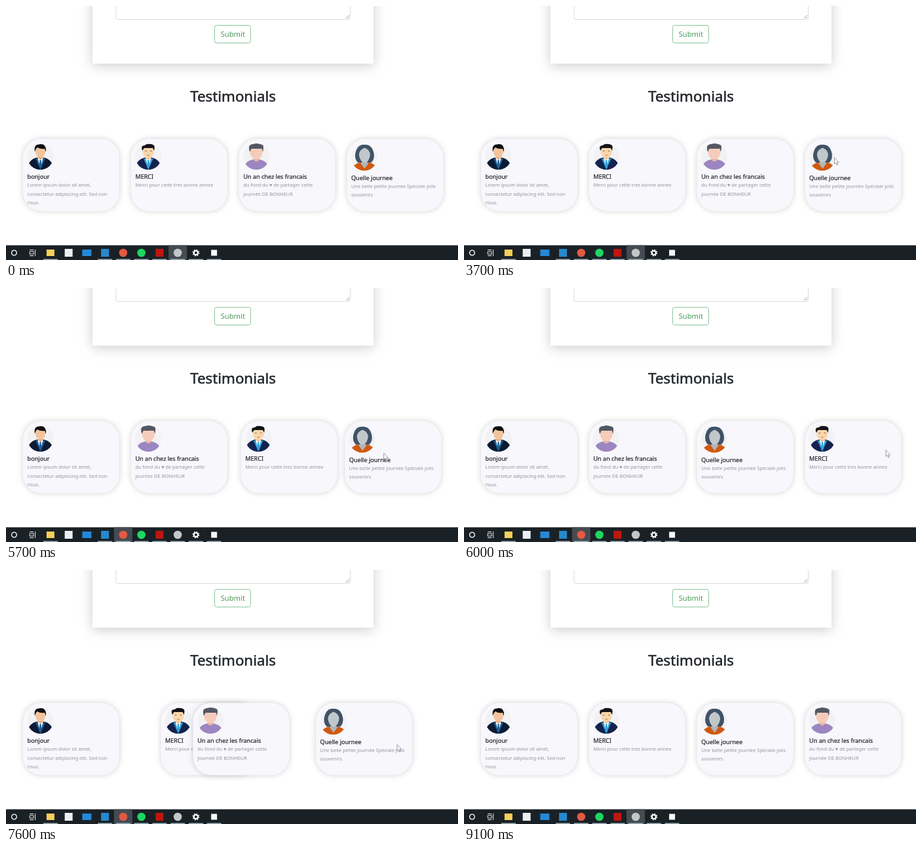
An HTML page that plays this animation: 690x388 px, repeating every 9.4 s.

```html
<!DOCTYPE html>
<html lang="en">
<head>
<meta charset="utf-8">
<title>Testimonials</title>
<style>
  html, body { margin: 0; width: 100%; height: 100%; overflow: hidden; background: #fff; }
  svg { display: block; width: 690px; height: 388px; font-family: "Noto Sans", "Open Sans", sans-serif; }
  .panel { fill: #fff; filter: drop-shadow(0 3px 9px rgba(0, 0, 0, .16)) drop-shadow(0 4px 12px rgba(110, 110, 170, .07)); }
  .title { font-size: 22.3px; fill: #212529; stroke: #212529; stroke-width: .5px; text-anchor: middle; }
  .submit { font-size: 11.2px; fill: #4b9a58; text-anchor: middle; }
  .box { fill: #f7f7fc; filter: drop-shadow(0 0 4px rgba(0, 0, 0, .18)); }
  .name { font-size: 9.1px; fill: #212529; stroke: #212529; stroke-width: .2px; }
  .note { font-size: 7.35px; fill: #9494a0; }
</style>
</head>
<body>
<svg viewBox="0 0 690 388">
  <defs><clipPath id="round"><circle cx="26.5" cy="27" r="20"/></clipPath></defs>

  <rect class="panel" x="132" y="-60" width="429" height="148"/>
  <rect x="168" y="-20" width="357.5" height="40.5" rx="2" fill="none" stroke="#d9dde1"/>
  <path d="M519 19L524 14M522 19L524 17" stroke="#8b8b8b" stroke-width=".8"/>
  <rect x="318.5" y="29.5" width="55" height="27" rx="3" fill="#fff" stroke="#8cc49a"/>
  <text class="submit" x="346.3" y="47.2">Submit</text>
  <text class="title" x="346.5" y="146.3">Testimonials</text>

  <g id="cards"></g>

  <rect y="365.5" width="690" height="22.5" fill="#1a2126"/>
  <rect id="active" y="365.5" width="28" height="22.5" fill="#454c51"/>
  <g id="icons"></g>
  <path id="cursor" d="M0 0V9.8L2.3 7.8 3.8 11.4 5.3 10.8 3.9 7.3H6.8Z" fill="#fff" stroke="#85858d" stroke-width=".8"/>
</svg>
<script>
const LOOP = 9400, STEP = 100, SLIDE = 300;
const $ = id => document.getElementById(id);
const slotX = slot => 26 + 164.8 * slot;
const iconX = i => 12.4 + 27.75 * i;

const suit = (cloth, tie, skin) => `
  <ellipse cx="26.5" cy="42" rx="18.5" ry="14" fill="${cloth}"/>
  <path d="M19 30L26.5 47 34 30Z" fill="${tie}"/>
  <path d="M22 28L26.5 44 31 28Z" fill="#fff"/>
  <path d="M25.500 32H27.500L28.300 43 26.500 46 24.700 43Z" fill="${tie}"/>
  <path d="M22.5 23H30.5V29L26.5 32 22.5 29Z" fill="${skin}"/>`;

const people = [
  {
    name: "bonjour",
    lines: ["Lorem ipsum dolor sit amet,", "consectetur adipiscing elit. Sed non", "risus."],
    art: suit("#0c1a33", "#1c5f96", "#e5ae85") + `
      <path d="M19 14Q26 8 34 14V20Q33 28 26.5 28.5 20 28 19 20Z" fill="#f3c49d"/>
      <path d="M18 20Q16 9 24 8.5 36 6 35 20L33 15Q26 16 22 13Q19 15 18 20Z" fill="#0d0d10"/>`
  },
  {
    name: "MERCI",
    lines: ["Merci pour cette tres bonne annee"],
    art: suit("#14224f", "#2d9fd5", "#edbd8e") + `
      <path d="M18 13H35V21Q33 29 26.5 29 20 29 18 21Z" fill="#fbd6ab"/>
      <path d="M17.5 18Q14 10 21 10L24 8Q35 7 36 12L35.5 18 33 14H20Z" fill="#141418"/>
      <path d="M21 18.5H24M29 18.5H32M25 25H28" stroke="#6a554c" stroke-width=".8"/>`
  },
  {
    name: "Un an chez les francais",
    lines: ["du fond du ♥ de partager cette", "journée DE BONHEUR"],
    art: `
      <ellipse cx="26.5" cy="45" rx="19" ry="14" fill="#9b86c1"/>
      <path d="M22 25H31V32Q26.5 37 22 32Z" fill="#e9b5a3"/>
      <path d="M17 15H36V22Q34 31 26.5 31 19 31 17 22Z" fill="#f5ccba"/>
      <path d="M16.5 20Q13 9 20 8 27 6 34 7.500Q39 8 36.500 20L35 15H19Z" fill="#535763"/>`
  },
  {
    name: "Quelle journee", dy: 1.6,
    lines: ["Une belle petite journée Spéciale jolis", "souvenirs"],
    art: `
      <path d="M17 35Q11 29 13 20 16 7 27 7 38 7 41 20 43 29 37 35Z" fill="#405365"/>
      <ellipse cx="27" cy="45" rx="19" ry="11" fill="#d2580f"/>
      <path d="M23 28H31V34L33 36 27 44 21 36 23 34Z" fill="#aeb6bc"/>
      <path d="M27 12Q36 16 35.500 23 34 34 27 35 20 34 18.500 23 18 16 27 12Z" fill="#c1c8cc"/>`
  }
];

$("cards").innerHTML = people.map(({ name, lines, art, dy = 0 }) => `
  <g><rect class="box" width="147" height="110.5" rx="28"/>
    <g transform="translate(0 ${dy})">
      <g clip-path="url(#round)"><circle cx="26.5" cy="27" r="20" fill="#f2f2f4"/>${art}</g>
      <text class="name" x="6.6" y="61">${name}</text>
      ${lines.map((line, i) => `<text class="note" x="6.6" y="${73.3 + 13.5 * i}">${line}</text>`).join("")}
    </g></g>`).join("");
const cards = [...$("cards").children];

// Taskbar: each icon is drawn around its own centre
const disc = color => `<circle r="6.3" fill="${color}"/>`;
const tile = (color, w = 12, h = 12) => `<rect x="${-w / 2}" y="${-h / 2}" width="${w}" height="${h}" fill="${color}"/>`;
const running = icon => icon + `<rect x="-11" y="9.5" width="22" height="1.5" fill="#9db3be"/>`;
const gear = `<g fill="none" stroke="#fff"><circle r="3" stroke-width="2"/>
  <circle r="4.6" stroke-width="1.6" stroke-dasharray="1.8 1.813"/></g>`;

const icons = [
  `<circle r="3.9" fill="none" stroke="#fff" stroke-width="1.3"/>`,
  `<path d="M-4 -4.5H2M-4 4.5H2M-4 -2H2V2H-4ZM4.5 -5V5" fill="none" stroke="#e8ebed"/>`,
  running(tile("#f6cf5b", 12, 10)), tile("#eaeff3"), tile("#2488d8", 14, 10),
  ...[tile("#2589cd"), disc("#e25a43"), disc("#1fd662"), tile("#bd1710"),
    disc("#c3c7c9"), gear, tile("#f5f7f8", 9, 9)].map(running)
];
const BROWSER = 6, RECORDER = 9;
$("icons").innerHTML = icons.map((icon, i) => `<g transform="translate(${iconX(i)} 377)">${icon}</g>`).join("");

// Each drag lifts a card out of one slot and drops it in another.
// The first card passed gives way at once, the rest after the lag.
const drags = [
  { at: 4529, from: 2, to: 1, lag: 53, drop: [216, 274.5] },
  { at: 5690, from: 2, to: 3, lag: 0, drop: [644, 247.5] },
  { at: 6585, from: 2, to: 3, lag: 0, drop: [591, 258] },
  { at: 7471, from: 1, to: 3, lag: 70, drop: [597, 266.5] }
];
const SHOW = 3700, HIDE = 9000;
const GRAB = 190, DROP = 120, REST = 200, REACH = 250;

const moves = cards.map(() => []);
const path = [{ at: SHOW, pos: [565.5, 231.5] }];
const order = cards.map((_, i) => i);

function reach(pos) {
  const last = path[path.length - 1];
  path.push({ at: last.at + REST, pos: last.pos }, { at: last.at + REST + REACH, pos });
}

for (const { at, from, to, lag, drop } of drags) {
  const grip = [slotX(from) + 55, 264];
  reach(grip);
  path.push({ at: at - GRAB, pos: grip }, { at: at + DROP, pos: drop });

  const [held] = order.splice(from, 1);
  const first = order[from < to ? from : from - 1];
  order.splice(to, 0, held);
  order.forEach((card, slot) => moves[card].push({ at: card === first ? at : at + lag, slot }));
}
reach([581, 258]);

// CSS "ease": cubic-bezier(.25, .1, .25, 1)
function ease(p) {
  if (p >= 1) return 1;
  let lo = 0, hi = 1, s;
  for (let i = 0; i < 20; i++) {
    s = (lo + hi) / 2;
    if (.75 * s * (1 - s) + s ** 3 < p) lo = s; else hi = s;
  }
  return .3 * s * (1 - s) ** 2 + 3 * s * s * (1 - s) + s ** 3;
}
const mix = (a, b, k) => a + (b - a) * k;

function place(card, t) {
  let slot = card, x = slotX(slot);
  for (const move of moves[card]) {
    if (t < move.at) break;
    x = mix(slotX(slot), slotX(move.slot), ease((t - move.at) / SLIDE));
    slot = move.slot;
  }
  return { card, slot, x };
}

function pointer(t) {
  const i = path.findIndex(key => key.at > t);
  if (i < 0) return path[path.length - 1].pos;
  const a = path[i - 1], b = path[i];
  const k = (t - a.at) / (b.at - a.at);
  return a.pos.map((v, n) => mix(v, b.pos[n], k * k * (3 - 2 * k)));
}

let stack = "";
function draw(t) {
  const spots = cards.map((_, i) => place(i, t));
  spots.forEach(({ card, x }) => cards[card].setAttribute("transform", `translate(${x} 203)`));

  // Later slots paint on top
  const sorted = spots.sort((a, b) => a.slot - b.slot).map(spot => spot.card);
  if (sorted.join() !== stack) {
    stack = sorted.join();
    $("cards").append(...sorted.map(i => cards[i]));
  }

  const dragging = t >= drags[0].at - GRAB && t < HIDE;
  $("active").setAttribute("x", iconX(dragging ? BROWSER : RECORDER) - 14);

  const visible = t >= SHOW && t < HIDE;
  $("cursor").style.display = visible ? "" : "none";
  if (visible) $("cursor").setAttribute("transform", `translate(${pointer(t)})`);
}

const begin = performance.now();
function tick() {
  const t = (performance.now() - begin) % LOOP;
  draw(Math.floor(t / STEP) * STEP);
  requestAnimationFrame(tick);
}
tick();
</script>
</body>
</html>
```
